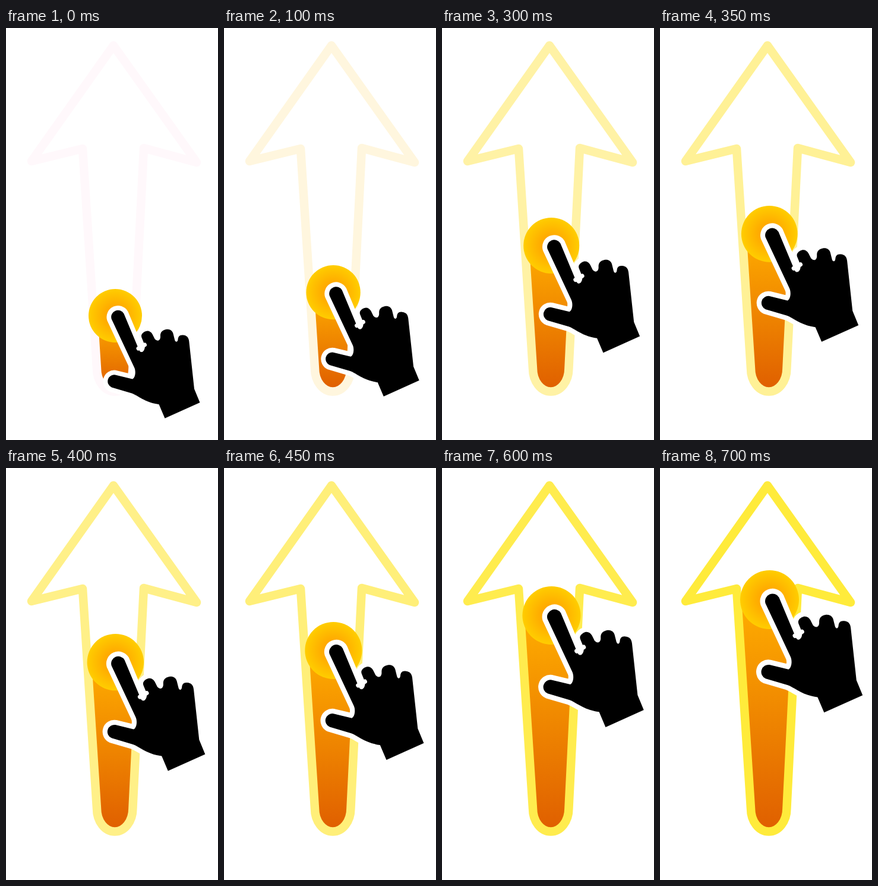
An HTML page for the animation above (750 ms loop, 357 by 693 pixels).

```html
<!DOCTYPE html>
<html lang="en">
<head>
<meta charset="utf-8">
<title>Swipe up</title>
<style>
  html, body { margin: 0; width: 100%; height: 100%; overflow: hidden; background: #fff; }
  svg { display: block; width: 100%; height: 100%; }
</style>
</head>
<body>
<svg viewBox="0 0 357 693">
  <defs>
    <linearGradient id="heat" gradientUnits="userSpaceOnUse" x1="0" x2="0" y1="484" y2="604">
      <stop offset="0" stop-color="#ffae00"/>
      <stop offset="1" stop-color="#e06000"/>
    </linearGradient>
    <radialGradient id="glow">
      <stop offset="0" stop-color="#ff9600"/>
      <stop offset="1" stop-color="#ffcd00"/>
    </radialGradient>
    <clipPath id="level"><rect id="levelBox" width="357" height="693"/></clipPath>
  </defs>
  <path clip-path="url(#level)" fill="url(#heat)"
    d="M129 203L153 573A30.2 38.5 0 0 0 213.4 573L232 202Z"/>
  <path id="arrow" fill="none" stroke-width="14.5" stroke-linejoin="round"
    d="M181 29.5L43 224L129 203L153 573A30.2 38.5 0 0 0 213.4 573L232 202L321 226Z"/>
  <g id="touch">
    <circle cx="184" cy="484" r="45" fill="url(#glow)"/>
    <path stroke="#fff" stroke-width="15.5" stroke-linejoin="round" paint-order="stroke"
      d="M257.5 633L267.5 656.5L326.5 630L317 607L308.3 527C307.5 520 304 517 298 516.5C292 516 290 519 289.5 524
      C289 529 285 529 284 524L281.5 514C280 508.5 275 506 269.5 507C262 508.5 259.5 513 260 519
      C260 526 255 528 250.5 523L246.5 515C243.5 509.5 238 508 233 511C227.5 514.5 227 518 229 522
      L233.5 533C235 540 231 546 227.5 545C225 544.5 224 541 223 539L198.5 480.5
      A11.4 11.4 0 0 0 177.7 489.5L216 571C219 577 218 588 213 590.5L184 583.5
      A11 11 0 0 0 178 604.5L212 614.5C222 618 234 630 257.5 633Z"/>
    <path d="M223 539L233.5 533" fill="none" stroke="#fff" stroke-width="7" stroke-linecap="round"/>
  </g>
</svg>
<script>
  const LOOP = 750, STEP = 50, RISE = 667;
  const el = id => document.getElementById(id);
  const arrow = el('arrow'), touch = el('touch'), heat = el('heat'), levelBox = el('levelBox');
  const lerp = (a, b, k) => a + (b - a) * k;
  const mix = (a, b, k) => `rgb(${a.map((v, i) => Math.round(lerp(v, b[i], k)))})`;

  function draw(ms) {
    const t = Math.floor((ms % LOOP) / STEP) * STEP;
    const k = Math.min(t / RISE, 1);
    const y = lerp(484, 221.6, k);
    const size = lerp(1, 1.1, k);
    arrow.setAttribute('stroke', mix([255, 248, 251], [255, 235, 59], k));
    heat.setAttribute('y1', y);
    levelBox.setAttribute('y', y);
    touch.setAttribute('transform',
      `translate(${lerp(184, 184.5, k)} ${y}) scale(${size}) translate(-184 -484)`);
  }

  const start = performance.now();
  function tick() {
    draw(performance.now() - start);
    requestAnimationFrame(tick);
  }
  tick();
</script>
</body>
</html>
```
